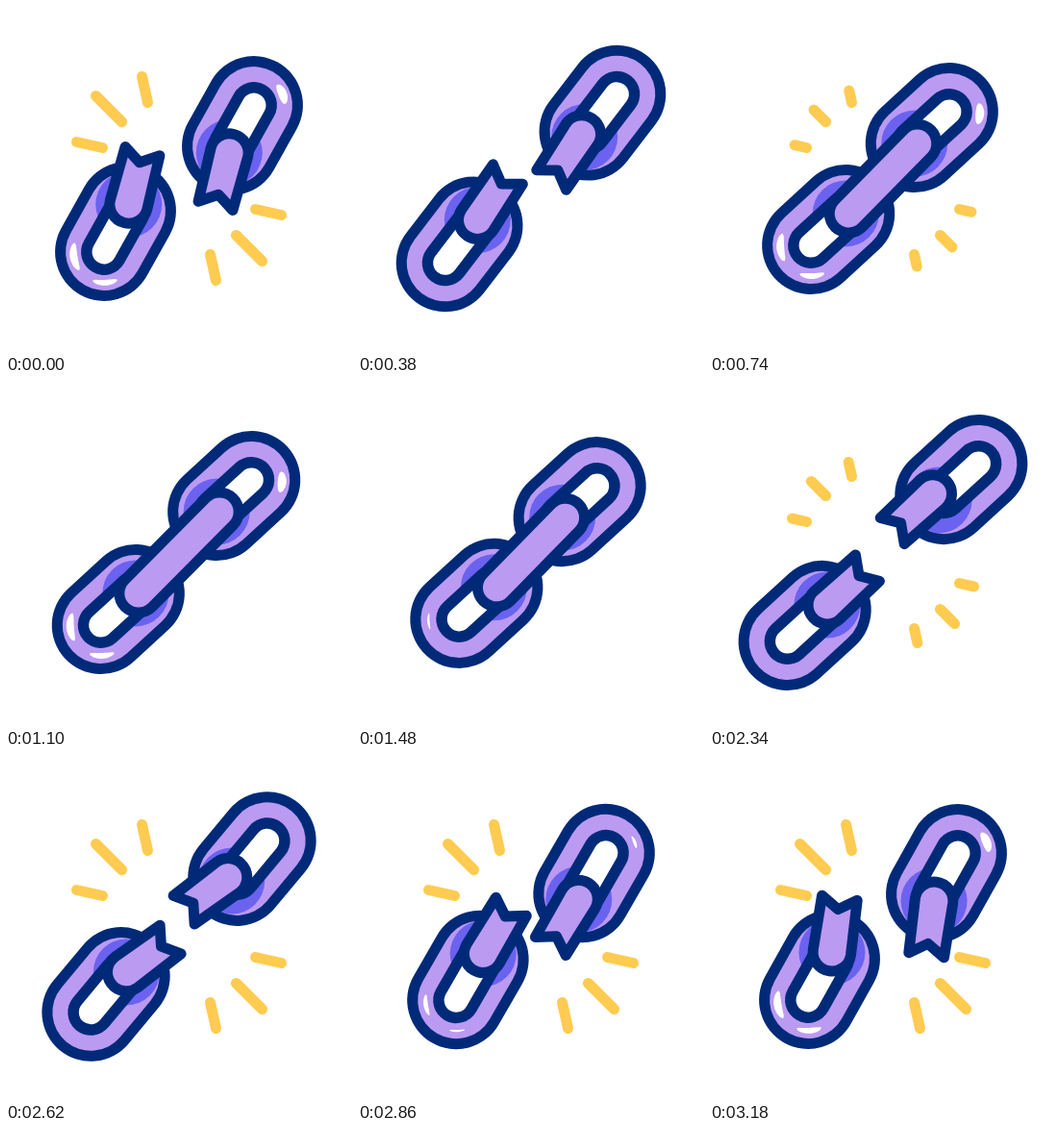
These frames come from a looping animation (360x360 px, 3.2 s). An HTML page with a canvas:

```html
<!DOCTYPE html>
<html lang="en">
<head>
<meta charset="utf-8">
<title>Breaking chain</title>
<style>
  html, body { margin: 0; width: 100%; height: 100%; overflow: hidden; background: #fff; }
  canvas { display: block; width: 360px; height: 360px; }
</style>
</head>
<body>
<canvas id="stage"></canvas>
<script>
const LOOP = 3200, STEP = 20, JOIN = 680, BREAK = 2270;
const INK = '#002a78', LILAC = '#bb9af2', SHADE = '#6b62f0', GOLD = '#ffcb50', WHITE = '#fff';
const CX = 180, CY = 179.5, RAD = Math.PI / 180;
const SLACK = 3; // joined links hang this far left of the bar
const CLOSED = 42.5; // tilt of the joined links

const canvas = document.getElementById('stage');
const dpr = window.devicePixelRatio || 1;
canvas.width = canvas.height = 360 * dpr;
const ctx = canvas.getContext('2d');

// Eased step from 0 to 1 between two times.
function ramp(t, from, to) {
  const s = Math.min(1, Math.max(0, (t - from) / (to - from)));
  return s * s * (3 - 2 * s);
}

// Distance of each link from the middle: pull apart, snap shut, breathe, burst, settle.
function spread(t) {
  const breath = t > 700 && t < 2260 ? (1 - Math.cos((t - 700) / 780 * 2 * Math.PI)) / 2 : 0;
  return 85.8 + 35.7 * (ramp(t, 240, 550) - ramp(t, 2400, 2840))
    - 44 * (ramp(t, 550, 700) - ramp(t, 2230, 2390)) + 9 * breath;
}

function tilt(t) {
  return CLOSED + 18.3 * (1 - ramp(t, 240, 540) + ramp(t, 2370, 2930));
}

// Angle of the torn end, which lags behind its link.
function tear(t) {
  return 75.5 - 30 * ramp(t, 220, 490) - 9 * ramp(t, 2240, 2500) + 45.5 * ramp(t, 2640, 3080);
}

function gloss(t) {
  const dip = ramp(t, 1300, 1480) - ramp(t, 1480, 1660);
  return 1 - ramp(t, 220, 330) + ramp(t, 650, 725) - .7 * dip
    - ramp(t, 2100, 2240) + ramp(t, 2760, 2940);
}

function line(x0, y0, x1, y1, width, color) {
  ctx.lineWidth = width;
  ctx.strokeStyle = color;
  ctx.beginPath();
  ctx.moveTo(x0, y0);
  ctx.lineTo(x1, y1);
  ctx.stroke();
}

// Runs a drawing once as is and once turned half round the middle.
function bothSides(draw) {
  for (let side = 0; side < 2; side++) {
    ctx.save();
    if (side) {
      ctx.translate(2 * CX, 2 * CY);
      ctx.rotate(Math.PI);
    }
    draw(side);
    ctx.restore();
  }
}

function pose(t, whole) {
  const d = spread(t), turn = tilt(t) - CLOSED;
  const a = tilt(t) * RAD, lean = tear(t) * RAD;
  const sway = -4.8 * Math.pow(turn / 18.3, 3);
  const x = CX - .731 * d + .682 * sway + (whole ? SLACK : 0);
  const y = CY + .682 * d + .731 * sway;
  const ux = 24.5 * Math.cos(a), uy = -24.5 * Math.sin(a);
  const near = [x + ux, y + uy], far = [x - ux, y - uy];
  const reach = whole ? 0 : 7;
  const cap = [near[0] + reach * Math.cos(lean), near[1] - reach * Math.sin(lean)];
  return { near, far, cap, lean, a, turn };
}

// Tapered arc of light around the far end of a link.
function glint(cx, cy, mid, half, thick, amount) {
  if (amount <= 0) return;
  const n = 16, span = half * (.4 + .6 * amount);
  ctx.beginPath();
  for (let i = 0; i <= 2 * n; i++) {
    const s = 1 - Math.abs(1 - i / n);
    const bulge = Math.sqrt(Math.abs(Math.sin(Math.PI * s))) * thick * amount / 2;
    const r = 32 + (i <= n ? bulge : -bulge);
    const q = (mid + span * (2 * s - 1)) * RAD;
    ctx.lineTo(cx + r * Math.cos(q), cy + r * Math.sin(q));
  }
  ctx.fillStyle = WHITE;
  ctx.fill();
}

function link(p, side, shine) {
  const ends = [...p.near, ...p.far], quarter = Math.PI / 2;
  line(...ends, 102, INK);
  line(...ends, 80, LILAC);

  ctx.save();
  ctx.beginPath();
  ctx.arc(...p.near, 40, -p.a - quarter, -p.a + quarter);
  ctx.arc(...p.far, 40, -p.a + quarter, -p.a + 3 * quarter);
  ctx.clip();
  ctx.fillStyle = SHADE;
  ctx.beginPath();
  ctx.arc(...p.cap, 34.5, 0, 2 * Math.PI);
  ctx.fill();
  ctx.restore();

  const faint = (shine - .35) / .65;
  if (side) {
    glint(...p.far, 184 - 1.4 * p.turn, 20, 9, faint);
  } else {
    glint(...p.far, 176 - .3 * p.turn, 27, 8, shine);
    glint(...p.far, 88, 24, 6, faint);
  }
  line(...ends, 48, INK);
  line(...ends, 25, WHITE);
}

function tornEnd(p) {
  ctx.translate(...p.cap);
  ctx.rotate(-p.lean);
  ctx.beginPath();
  ctx.arc(0, 0, 19.8, Math.PI / 2, Math.PI * 1.5);
  ctx.lineTo(57, -18.5);
  ctx.lineTo(45, 0);
  ctx.lineTo(57, 18.5);
  ctx.closePath();
  ctx.fillStyle = LILAC;
  ctx.fill();
  ctx.lineWidth = 11;
  ctx.strokeStyle = INK;
  ctx.stroke();
}

// Three strokes fanned around the diagonal, shown from root to tip (0 to 1).
function sparks(root, tip) {
  if (tip - root < .01) return;
  bothSides(() => {
    for (let k = -1; k <= 1; k++) {
      const off = Math.abs(k), angle = (45 + 32.5 * k) * RAD;
      const x = 120.5 + 3.5 * off + 23.5 * k, y = 120.5 + 3.5 * off - 23.5 * k;
      const size = 38.2 - 10.5 * off;
      const dx = -size * Math.cos(angle), dy = -size * Math.sin(angle);
      line(x + dx * root, y + dy * root, x + dx * tip, y + dy * tip, 11, GOLD);
    }
  });
}

function draw(t) {
  const whole = t >= JOIN && t < BREAK;
  const p = pose(t, whole), shine = gloss(t);
  ctx.setTransform(dpr, 0, 0, dpr, 0, 0);
  ctx.fillStyle = WHITE;
  ctx.fillRect(0, 0, 360, 360);
  ctx.lineCap = ctx.lineJoin = 'round';

  const since = (t - BREAK + LOOP) % LOOP;
  sparks(ramp(t, 820, 960), ramp(t, 695, 790));
  sparks(ramp(since, 1150, 1280), ramp(since, 0, 130));

  ctx.save();
  if (whole) ctx.translate(-SLACK, 0);
  bothSides(side => link(p, side, shine));
  ctx.restore();

  if (whole) {
    const [x, y] = p.cap, bar = [x, y, 2 * CX - x, 2 * CY - y];
    line(...bar, 51, INK);
    line(...bar, 29, LILAC);
  } else {
    const drift = .35 * (18.3 - p.turn);
    bothSides(side => {
      if (side) ctx.translate(drift, drift);
      tornEnd(p);
    });
  }
}

const start = performance.now();
function tick() {
  const t = (performance.now() - start) % LOOP;
  draw(Math.floor(t / STEP) * STEP);
  requestAnimationFrame(tick);
}
tick();
</script>
</body>
</html>
```
